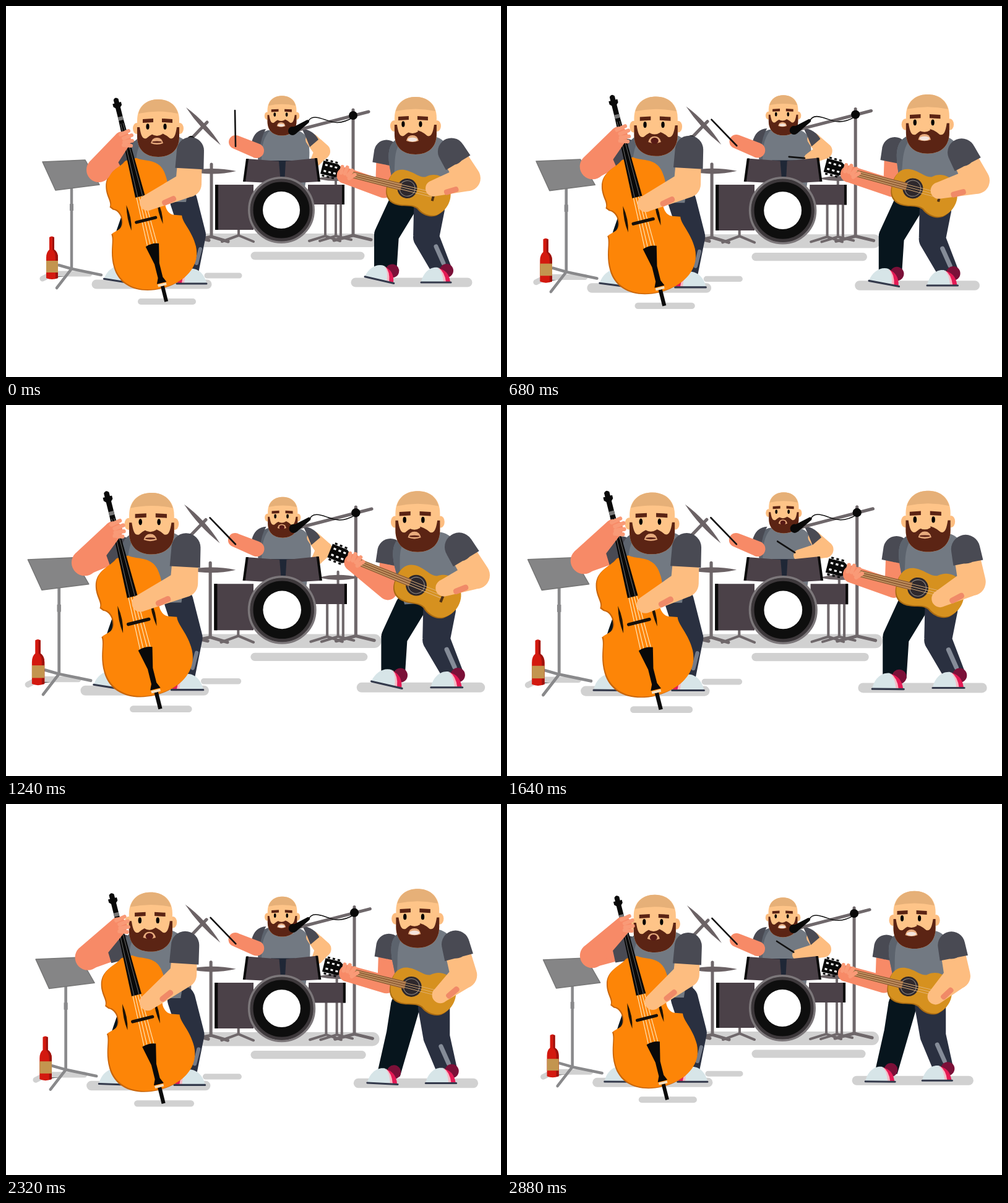
Recreate the animation shown at these times as an HTML page. Size 800 px wide and 600 px high, loop 2.92 s.

```html
<!DOCTYPE html>
<html lang="en">
<head>
<meta charset="utf-8">
<title>Trio</title>
<style>
html, body { margin: 0; width: 100%; height: 100%; overflow: hidden; background: #fff; }
svg { display: block; width: 800px; height: 600px; }
.pill { stroke: #d1d1d1; stroke-linecap: round; }
.metal { stroke: #6f686b; fill: none; stroke-linecap: round; stroke-linejoin: round; }
.plate { fill: #6b6265; }
.shell { fill: #4b4148; }
.dark { fill: #090909; }
.skin { fill: #fdbd80; }
.salmon { fill: #f78a67; }
.shirt { fill: #727982; }
.sleeve { fill: #494a53; }
.leg { fill: #2a3040; }
.legDark { fill: #07151d; }
.scar { fill: #f08a68; }
.fingers { stroke: #f99a77; stroke-width: 6; stroke-linecap: round; }
.stick { stroke: #111; stroke-width: 2.6; stroke-linecap: round; }
.hair { fill: #5b2414; }
</style>
</head>
<body>
<svg viewBox="0 0 800 600">
<defs>
  <g id="skull">
    <ellipse class="skin" cx="-35" cy="1" rx="6" ry="9"/>
    <ellipse class="skin" cx="35" cy="1" rx="6" ry="9"/>
    <path fill="#fec488" d="M-34-12C-34-34-20-46 0-46S34-34 34-12V14C34 36 20 47 0 47S-34 36-34 14Z"/>
    <path fill="#e6b078" d="M-32-23C-28-38-16-46 0-46S28-38 32-23Q0-30-32-23Z"/>
  </g>
  <g id="face">
    <path class="hair" d="M-24-14l17-1v6l-17 1zM7-15l17 1v6l-17-1z"/>
    <ellipse cx="-16" cy="-2" rx="2.6" ry="4.8"/>
    <ellipse cx="12" cy="-2" rx="2.6" ry="4.8"/>
    <path fill="#fec488" d="M-6 0H4L8 10Q-1 16-10 10Z"/>
    <path fill="#e8ab7d" d="M-11 25Q-9 16-1 16T9 25Q-1 29-11 25Z"/>
  </g>
  <path id="beard" class="hair" d="M-34-1H-30C-28 13-25 19-19 17Q-9 8 0 8T19 17C25 19 28 13 30-1H34V14C34 36 20 47 0 47S-34 36-34 14Z"/>
  <g id="torso">
    <path class="shirt" d="M-28-24Q0-31 28-24C48-18 52 0 50 30L42 82H-36L-46 30C-52 0-48-18-28-24Z"/>
    <path fill="#5c636d" d="M-28-24C-48-18-52 0-46 30L-42 54C-36 18-44 0-24-24Z"/>
  </g>
  <g id="shoe">
    <circle fill="#7b1038" cx="-9" cy="-18" r="11"/>
    <path fill="#e51a55" d="M-24-22Q-6-20-3 0H-18Z"/>
    <path fill="#f7b9c4" d="M-22-23Q-12-16-10 0H-20Z"/>
    <path fill="#d7e5e8" d="M-50 0C-47-14-36-25-23-23Q-15-16-14 0Z"/>
    <path stroke="#343a4c" stroke-width="3" stroke-linecap="round" d="M-50 1H-2"/>
  </g>
  <path id="bassShape" d="M-9-100C-20-90-46-92-49-62C-50-48-45-42-50-34L-46-29C-33-24-33 0-45 5L-58 9C-56 20-68 36-67 62C-66 96-36 114 0 114S67 96 68 62C68 36 56 20 58 8L46 4C33 0 33-24 44-28L49-34C45-42 50-48 48-62C46-92 20-90 9-100Z"/>
  <path id="guitarShape" d="M-32 0C-33-20-22-29-6-28C8-27 14-22 24-25C34-34 48-35 58-27C76-12 76 14 58 29C48 36 34 34 24 26C14 22 8 27-6 28C-22 29-33 20-32 0Z"/>
</defs>

<g id="back">
  <path class="pill" stroke-width="22" d="M322 379H590"/>
  <path class="pill" stroke-width="13" d="M402 404H573"/>
  <path class="metal" stroke-width="5" d="M325 188L298 216V374M298 372L268 381M298 372L328 379M332 256V373L304 379M332 373L359 381"/>
  <path class="plate" d="M291 164Q324 188 347 225Q313 198 291 164ZM296 267Q333 259 372 267Q333 276 296 267Z"/>
  <circle class="dark" cx="299" cy="216" r="6"/>
  <g id="drummer">
    <use href="#torso" transform="translate(447 222) scale(.86)"/>
    <path fill="#1f2736" d="M428 250H466V290H428Z"/>
    <path class="sleeve" d="M420 199Q402 200 397 220L410 234Q412 212 420 199Z"/>
    <path class="salmon" id="dArmL"/>
    <path class="stick" id="dStickL" d="M0 1V-57"/>
    <g id="dHead"></g>
    <path class="skin" id="dArmR"/>
    <path class="sleeve" d="M478 198Q497 201 505 216L491 228Q485 212 478 198Z"/>
    <path class="stick" id="dStickR"/>
  </g>
  <path class="metal" stroke-width="4" d="M376 358V371L349 381M376 371L400 381M516 320V372L490 380M516 372L540 380M533 270V372L507 380M533 372L558 378M541 320V372"/>
  <path class="plate" d="M502 279Q533 271 566 279Q533 287 502 279Z"/>
  <path class="shell" d="M338 289H400V362H338ZM488 289H547V321H488Z"/>
  <path class="dark" d="M338 289h5v73h-5zM543 289h4v32h-4z"/>
  <path class="shell" d="M389 247L441 251 444 287 384 284ZM452 251L502 246 507 284 450 287Z"/>
  <path class="dark" d="M388 247h4l-5 37h-4zM499 246h4l5 38h-4z"/>
  <circle cx="445" cy="330" r="52" fill="#101010" stroke="#7c777a" stroke-width="4"/>
  <circle cx="445" cy="330" r="48" fill="#0e0e0e" stroke="#3d383b" stroke-width="5"/>
  <circle cx="445" cy="330" r="30" fill="#fff"/>
  <path class="metal" stroke-width="5" d="M561 168V371L530 379M561 371L590 378M586 171L470 201"/>
  <path fill="none" stroke="#111" stroke-width="1.5" d="M488 188C492 176 505 180 516 184S540 193 561 180"/>
  <circle class="dark" cx="561" cy="177" r="7"/>
  <path class="dark" d="M462 197L487 184Q492 185 489 189L468 207Z"/>
  <circle class="dark" cx="463" cy="202" r="7"/>
</g>

<g id="front">
  <path class="pill" stroke-width="9" d="M59 441L75 433H135M325 436H377"/>
  <path class="pill" stroke-width="15" d="M146 450H325"/>
  <path class="pill" stroke-width="10" d="M218 478H302"/>
  <path fill="none" stroke="#89898b" stroke-width="4.5" stroke-linecap="round" d="M106 290V425L82 456M106 425L154 435M106 425L85 419"/>
  <path stroke="#89898b" stroke-width="6" d="M106 320V331"/>
  <path fill="#858586" stroke="#777" stroke-width="1.5" stroke-linejoin="round" d="M59 252L128 249 132 256 151 289 80 298Z"/>
  <path fill="#d3190f" d="M70 374Q74 371 78 374V394Q84 398 84 407V440Q74 444 65 440V407Q65 398 70 394Z"/>
  <path fill="#9e120d" d="M75 374h3v20q6 4 6 13v33l-4 1v-33q0-10-5-14z"/>
  <path fill="#c3954f" d="M65 412h19v19h-19z"/>
  <path class="legDark" id="bLegL"/>
  <path class="leg" id="bLegR"/>
  <path fill="none" stroke="#747b88" stroke-width="6" stroke-linecap="round" d="M314 393L308 416"/>
  <use id="bShoe" href="#shoe"/>
  <use href="#shoe" transform="translate(274 448) scale(-1 1)"/>
  <path class="salmon" id="bUpperL"/>
  <path class="sleeve" id="bSleeveL"/>
  <use id="bTorso" href="#torso"/>
  <g id="bHead"></g>
  <g transform="translate(226 345) rotate(-14)">
    <use href="#bassShape" fill="#c96508" transform="translate(-2 1)"/>
    <use href="#bassShape" fill="#fd8507"/>
    <path class="dark" d="M-4-166L4-166 8-38H-8ZM-4-165V-186L-7-189V-194H-4V-200Q0-205 4-200V-194H7V-189L4-186V-165Z"/>
    <path stroke="#777" stroke-width="6" d="M-4-168H4"/>
    <path fill="#1d1206" d="M-25-30Q-21-8-27 12Q-30-8-25-30ZM25-26Q30-6 25 14Q21-8 25-26Z"/>
    <path fill="none" stroke="#fff2cf" stroke-width="1" d="M-6-38L-8 45M-2-38L-3 45M2-38L3 45M6-38L8 45"/>
    <path fill="none" stroke="#777" stroke-width=".8" d="M-2-160L-4-38M2-160L4-38"/>
    <path stroke="#16100b" stroke-width="5" stroke-linecap="round" d="M-16 1H16"/>
    <path class="dark" d="M-11 43Q0 39 11 43L4 74V97L8 106H-8L-4 97V74Z"/>
    <path stroke="#0b0b0b" stroke-width="6" d="M0 111V137"/>
    <path stroke="#f3dfc1" stroke-width="4" d="M-7 109H7"/>
  </g>
  <path class="salmon" id="bForeL"/>
  <path class="fingers" id="bFingers" d="M-3-9L10-15M2-3L15-8M3 3L16 1M2 8L14 9"/>
  <path class="skin" id="bArmR"/>
  <path class="sleeve" id="bSleeveR"/>
  <rect class="scar" id="bScar" x="-12" y="-4" width="24" height="9" rx="4"/>
</g>

<g id="right">
  <path class="pill" stroke-width="15" d="M565 447H746"/>
  <path class="legDark" id="gLegL"/>
  <path class="leg" id="gLegR"/>
  <path fill="none" stroke="#858c98" stroke-width="7" stroke-linecap="round" d="M695 389L707 416"/>
  <use id="gShoe" href="#shoe"/>
  <use href="#shoe" transform="translate(721 446)"/>
  <path class="salmon" id="gArmL"/>
  <path class="sleeve" id="gSleeveL"/>
  <use id="gTorso" href="#torso"/>
  <g id="gHead"></g>
  <g id="guitar">
    <use href="#guitarShape" fill="#a96a12" transform="translate(-1 2)"/>
    <use href="#guitarShape" fill="#d6911f"/>
    <circle r="16" fill="#2e282c"/>
    <circle r="12.5" fill="none" stroke="#8f8a86" stroke-width="1"/>
    <path fill="#94623a" d="M-112-5L-10-6V6L-112 5Z"/>
    <path fill="none" stroke="#e2b47d" stroke-width=".9" d="M-112-3L44-4M-112 0H44M-112 3L44 4"/>
    <path stroke="#4f3115" stroke-width="4" d="M44-10V10"/>
    <path class="dark" d="M-110-6L-118-11H-142V11H-118L-110 6Z"/>
    <path fill="none" stroke="#fff" stroke-width="3" stroke-dasharray="4 4" d="M-138-5H-118M-138 5H-118"/>
    <path fill="none" stroke="#111" stroke-width="3" stroke-dasharray="4 4" d="M-139-13H-118M-139 13H-118"/>
  </g>
  <path class="salmon" id="gHand"/>
  <path class="fingers" id="gFingers" d="M-6-4L-4-14M0-3L4-13M5 0L12-8M7 5L16-1"/>
  <path class="skin" id="gArmR"/>
  <path class="sleeve" id="gSleeveR"/>
  <rect class="scar" id="gScar" x="-12" y="-4" width="24" height="9" rx="4"/>
</g>
</svg>
<script>
const LOOP = 2920, STEP = 40, PEAK = 1500;
const CENTER = [400, 280];
const DEPTH = { back: .031, front: .079, right: .067 };
const MOUTHS = {
  shut: { rx: 8, ry: 1.5, fill: '#5a2015' },
  open: { rx: 6, ry: 5, fill: '#571a16' },
  teeth: { rx: 8, ry: 3.2, fill: '#f3e4dc' }
};

const $ = id => document.getElementById(id);
const set = (id, name, value) => $(id).setAttribute(name, value);
const draw = (id, d) => set(id, 'd', d);
const place = (id, [x, y], rest = '') => set(id, 'transform', `translate(${x} ${y}) ${rest}`);

const mix = (a, b, u) => a + (b - a) * u;
const blend = (a, b, u) => a.map((n, i) => mix(n, b[i], u));
const add = (a, x, y) => [a[0] + x, a[1] + y];
const polar = (angle, x, y) => {
  const c = Math.cos(angle), s = Math.sin(angle);
  return [x * c - y * s, x * s + y * c];
};
const rad = deg => deg * Math.PI / 180;
function smooth(u) {
  u = Math.min(1, Math.max(0, u));
  return u * u * (3 - 2 * u);
}
// Repeating accent: 1 on the beat, near 0 for half of the period.
const accent = (t, period) => ((1 + Math.cos(2 * Math.PI * t / period)) / 2) ** 2;

function camera(t) {
  const u = t < PEAK ? t / PEAK : (LOOP - t) / (LOOP - PEAK);
  return (u + smooth(u)) / 2;
}

function toward(a, b, dist) {
  return blend(a, b, dist / (Math.hypot(b[0] - a[0], b[1] - a[1]) || 1));
}
const disc = ([x, y], r) => `M${x - r} ${y}a${r} ${r} 0 1 0 ${2 * r} 0a${r} ${r} 0 1 0 ${-2 * r} 0Z`;
function taper(a, ra, b, rb, flat) {
  const dx = b[0] - a[0], dy = b[1] - a[1], len = Math.hypot(dx, dy) || 1;
  const at = (p, r) => add(p, -dy / len * r, dx / len * r);
  return `M${at(a, ra)}L${at(b, rb)} ${at(b, -rb)} ${at(a, -ra)}Z` +
    disc(a, ra) + (flat ? '' : disc(b, rb));
}
const limb = (a, ra, b, rb, c, rc, flat) => taper(a, ra, b, rb) + taper(b, rb, c, rc, flat);

function addHead(who, shift) {
  $(who + 'Head').innerHTML = `<use href="#skull"/><use href="#beard"/>
    <g transform="translate(${shift} 0)"><use href="#face"/>
    <ellipse id="${who}Mouth" cx="-1" cy="23"/></g>`;
}
function sing(who, kind) {
  for (const [name, value] of Object.entries(MOUTHS[kind])) set(who + 'Mouth', name, value);
}

function strummingArm(who, shoulder, elbow, hand, sleeve) {
  draw(who + 'ArmR', limb(shoulder, 19, elbow, 21, hand, 13));
  draw(who + 'SleeveR', taper(shoulder, 22, toward(shoulder, elbow, sleeve), 23, true));
  const tilt = Math.atan2(elbow[1] - hand[1], elbow[0] - hand[0]) * 180 / Math.PI;
  place(who + 'Scar', add(blend(elbow, hand, .48), 0, 12), `rotate(${tilt})`);
}

function drawBassist({ t, rise, strum }) {
  const slide = t / LOOP;
  const shoulder = [298 - 5 * rise, 234 - 4 * rise];
  const shoulderL = add(shoulder, -98, 3);
  const elbowL = [150 - 12 * slide, 265 - 20 * slide];
  const handL = [188, 217 - 21 * slide];
  draw('bLegL', limb([215, 325], 22, [198, 368], 20, [192, 430], 16, true));
  draw('bLegR', limb([287, 315], 22, [303, 370], 20, [294, 430], 17, true));
  place('bShoe', [208, 448], `rotate(${9 * strum})`);
  draw('bUpperL', taper(shoulderL, 16, elbowL, 19));
  draw('bSleeveL', taper(shoulderL, 20, toward(shoulderL, elbowL, 24), 19, true));
  place('bTorso', add(shoulder, -49, 1));
  place('bHead', [246 - 7 * rise, 197 - 4 * rise]);
  draw('bForeL', taper(elbowL, 20, handL, 14));
  place('bFingers', handL);
  strummingArm('b', shoulder, [295 - 5 * rise, 288 - 12 * rise], [236 - 7 * strum, 320 - 2 * strum], 29);
}

function drawGuitarist({ t, rise, strum, hit }) {
  const sway = mix(7 * Math.cos(2 * Math.PI * (t - 440) / 1600), -3, rise);
  const chest = [668 + sway, 236 - 6 * rise];
  const lean = rad(.55 * sway);
  const shoulder = add(chest, ...polar(lean, 53, 0));
  const shoulderL = add(chest, ...polar(lean, -52, 0));
  const elbowL = add(shoulderL, -4, 60);
  const guitar = [648.5, 295 - 4 * hit], angle = 14 + 8 * hit;
  const handL = add(guitar, ...polar(rad(angle), -103, 4));
  draw('gLegL', limb([639, 325], 23, [615 + 14 * rise, 370], 20, [613, 432], 18, true));
  draw('gLegR', limb([684, 328], 25, [679 + 9 * rise, 374], 21, [705, 428], 16, true));
  place('gShoe', [629, 448], `rotate(${13 * strum})`);
  draw('gArmL', limb(shoulderL, 16, elbowL, 14, handL, 13));
  draw('gSleeveL', taper(shoulderL, 20, toward(shoulderL, add(elbowL, -8, 0), 20), 19, true));
  place('gTorso', chest, `rotate(${.55 * sway})`);
  place('gHead', [664 + 1.9 * sway, 193 - 6 * rise]);
  place('guitar', guitar, `rotate(${angle})`);
  draw('gHand', disc(handL, 13));
  place('gFingers', handL);
  strummingArm('g', shoulder, add(shoulder, 9 + 17 * strum, 50 - 7 * strum),
    [682 + 9 * strum + 10 * rise, 312 - 17 * strum], 21);
}

function drawDrummer({ t, rise, hit }) {
  const roll = accent(t - 440, 1220);
  const raised = 1 - smooth(t / 300);
  const hand = blend([502, 250], [470, 244], roll);
  const tip = blend([470, 262], [436, 222], roll);
  place('dHead', [446, 177 + 7 * hit + 6 * rise], 'scale(.69)');
  draw('dArmL', taper([405, 234], 12, [371, 220], 11));
  place('dStickL', [371, 226], `rotate(${43 * raised - 44})`);
  draw('dArmR', limb([494, 216], 10, [511, 235], 13, hand, 9));
  draw('dStickR', `M${tip}L${toward(hand, tip, 8)}`);
}

function render(time) {
  const t = Math.floor(time % LOOP / STEP) * STEP;
  const zoom = camera(t), near = zoom > .5;
  const rise = smooth((t - 1640) / 680);
  const mood = { t, rise, strum: accent(t, 620), hit: accent(t - 440, 800) * (1 - rise) };
  for (const layer in DEPTH) {
    place(layer, CENTER, `scale(${1 + DEPTH[layer] * zoom}) translate(${-CENTER[0]} ${-CENTER[1]})`);
  }
  drawBassist(mood);
  drawGuitarist(mood);
  drawDrummer(mood);
  sing('b', near || t < 200 ? 'shut' : 'open');
  sing('g', near ? 'shut' : 'teeth');
  sing('d', near ? 'open' : 'teeth');
}

addHead('b', -1);
addHead('g', -4);
addHead('d', -1);

function tick() {
  render(performance.now());
  requestAnimationFrame(tick);
}
tick();
</script>
</body>
</html>
```
